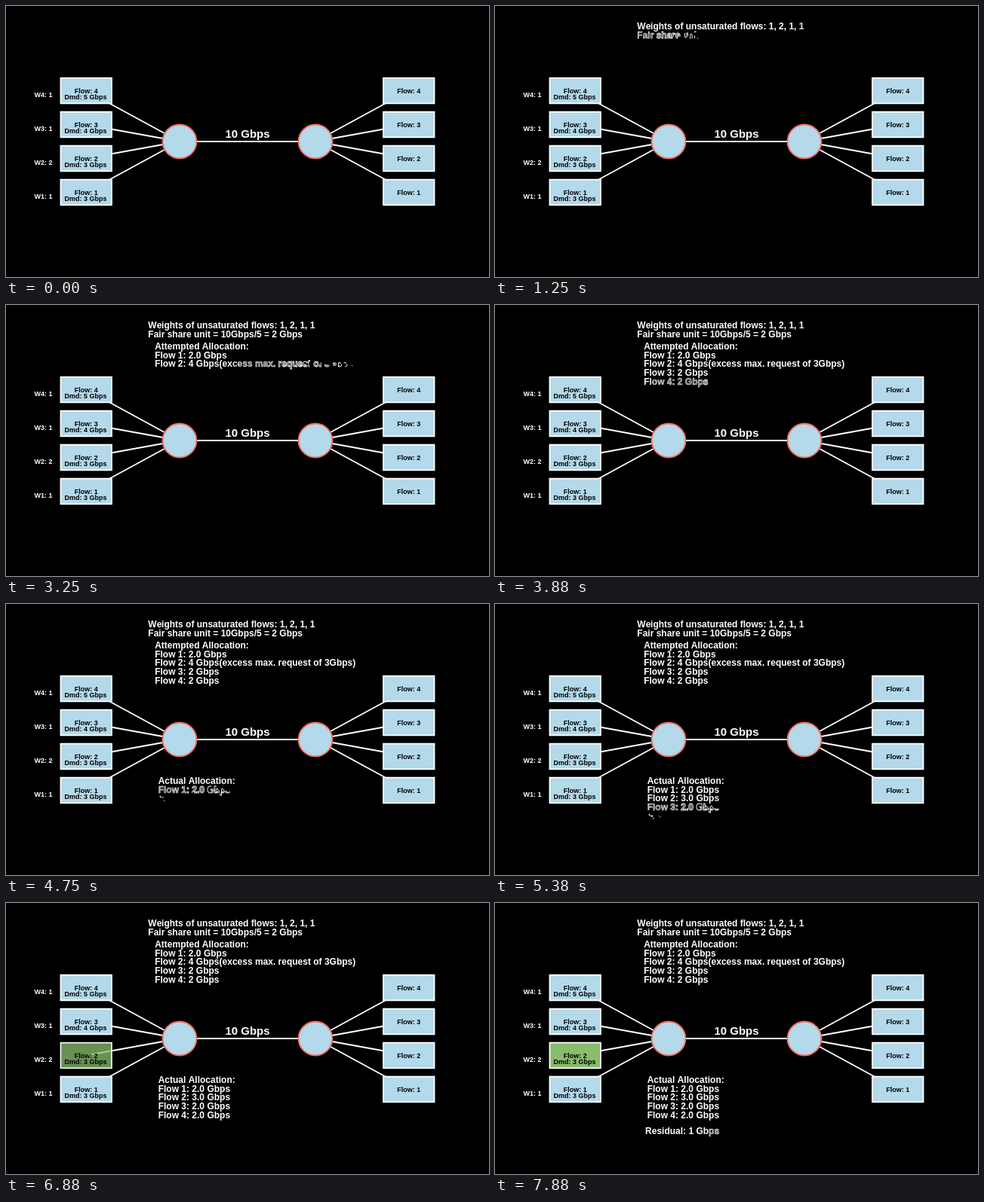
These frames come from a looping animation (640x360 px, 8 s). An HTML page with a canvas:

```html
<!DOCTYPE html>
<html lang="en">
<head>
<meta charset="utf-8">
<title>Weighted fair share</title>
<style>
  html, body { margin: 0; width: 100%; height: 100%; overflow: hidden; background: #000; }
  canvas { display: block; }
</style>
</head>
<body>
<canvas id="stage" width="640" height="360"></canvas>
<script>
const ctx = document.getElementById('stage').getContext('2d');
const LOOP = 8000, STEP = 125;
const BLUE = '#b3d9ea', GREEN = '#88bd6c', RED = '#f56a5a';
const LINE = 1.8, PEN = 0.9, PITCH = 11.7;
const BOX_W = 67.5, BOX_H = 33.75;
const HUB_L = 230, HUB_R = 410, BOX_L = 106.25, BOX_R = 533.75, MID = 180;
const SWAP = { start: 5990, time: 1000 };
const flows = [
  { id: 4, demand: 5, weight: 1, y: 112.5 },
  { id: 3, demand: 4, weight: 1, y: 157.5 },
  { id: 2, demand: 3, weight: 2, y: 202.5 },
  { id: 1, demand: 3, weight: 1, y: 247.5 },
];

const clamp = v => Math.max(0, Math.min(1, v));
const setFont = size => { ctx.font = `bold ${size}px "Liberation Sans", Arial, sans-serif`; };

function note(start, time, x, y, lines) {
  setFont(12);
  const glyphs = [];
  lines.forEach((line, row) => {
    [...line].forEach((ch, i) => {
      if (ch === ' ') return;
      const before = ctx.measureText(line.slice(0, i)).width;
      const w = ctx.measureText(ch).width;
      glyphs.push({ ch, x: x + before, y: y + row * PITCH, outline: w * 5.5 });
    });
  });
  return { start, time, glyphs, lag: Math.min(4 / glyphs.length, 0.2) };
}

const notes = [
  note(40, 2000, 188.3, 31.3, [
    'Weights of unsaturated flows: 1, 2, 1, 1',
    'Fair share unit = 10Gbps/5 = 2 Gbps']),
  note(2050, 2000, 197.2, 59, [
    'Attempted Allocation:',
    'Flow 1: 2.0 Gbps',
    'Flow 2: 4 Gbps(excess max. request of 3Gbps)',
    'Flow 3: 2 Gbps',
    'Flow 4: 2 Gbps']),
  note(4010, 2000, 201.7, 238.8, [
    'Actual Allocation:',
    'Flow 1: 2.0 Gbps',
    'Flow 2: 3.0 Gbps',
    'Flow 3: 2.0 Gbps',
    'Flow 4: 2.0 Gbps']),
  note(6980, 1000, 199.1, 307.3, ['Residual: 1 Gbps']),
];

function label(text, x, y, size, color) {
  setFont(size);
  ctx.textAlign = 'center';
  ctx.fillStyle = color;
  ctx.fillText(text, x, y);
}

function line(x1, y1, x2, y2) {
  ctx.beginPath();
  ctx.moveTo(x1, y1);
  ctx.lineTo(x2, y2);
  ctx.stroke();
}

// Outline in the first half of the progress p, fill in the second half.
function penThenFill(p, length, endWidth, stroke, fill) {
  const solid = clamp(2 * p - 1);
  const width = PEN + (endWidth - PEN) * solid;
  if (solid > 0) {
    ctx.globalAlpha = solid;
    fill();
    ctx.globalAlpha = 1;
  }
  if (p <= 0 || width <= 0) return;
  ctx.lineWidth = width;
  ctx.setLineDash(p < 0.5 ? [length * 2 * p, 9999] : []);
  stroke();
  ctx.setLineDash([]);
}

function box(x, y, color, p = 1) {
  const rect = [x - BOX_W / 2, y - BOX_H / 2, BOX_W, BOX_H];
  ctx.fillStyle = color;
  ctx.strokeStyle = '#fff';
  penThenFill(p, 2 * (BOX_W + BOX_H), LINE,
    () => ctx.strokeRect(...rect), () => ctx.fillRect(...rect));
}

function hub(x) {
  ctx.beginPath();
  ctx.arc(x, MID, 22.5, 0, 2 * Math.PI);
  ctx.fillStyle = BLUE;
  ctx.strokeStyle = RED;
  ctx.lineWidth = LINE;
  ctx.fill();
  ctx.stroke();
}

function network(t) {
  ctx.strokeStyle = '#fff';
  ctx.lineWidth = LINE;
  line(HUB_L, MID, HUB_R, MID);
  for (const { y } of flows) {
    line(BOX_L, y, HUB_L, MID);
    line(BOX_R, y, HUB_R, MID);
  }
  hub(HUB_L);
  hub(HUB_R);
  label('10 Gbps', 320, 175.3, 15, '#fff');

  for (const { id, demand, weight, y } of flows) {
    if (id === 2 && t >= SWAP.start) box(BOX_L, y, GREEN, clamp((t - SWAP.start) / SWAP.time));
    else box(BOX_L, y, BLUE);
    box(BOX_R, y, BLUE);
    label(`Flow: ${id}`, BOX_L, y + 3.2, 9, '#000');
    label(`Dmd: ${demand} Gbps`, 105.6, y + 11.6, 9, '#000');
    label(`Flow: ${id}`, BOX_R, y + 3.2, 9, '#000');
    label(`W${weight === 2 ? 2 : id}: ${weight}`, 49.5, y + 8, 9, '#fff');
  }
}

function write({ start, time, glyphs, lag }, t) {
  const head = clamp((t - start) / time) * (1 + (glyphs.length - 1) * lag);
  setFont(12);
  ctx.textAlign = 'left';
  ctx.fillStyle = ctx.strokeStyle = '#fff';
  glyphs.forEach(({ ch, x, y, outline }, i) => {
    penThenFill(clamp(head - i * lag), outline, 0,
      () => ctx.strokeText(ch, x, y), () => ctx.fillText(ch, x, y));
  });
}

function draw() {
  const t = Math.floor((performance.now() % LOOP) / STEP) * STEP;
  ctx.fillStyle = '#000';
  ctx.fillRect(0, 0, 640, 360);
  network(t);
  notes.forEach(n => write(n, t));
  requestAnimationFrame(draw);
}
draw();
</script>
</body>
</html>
```
